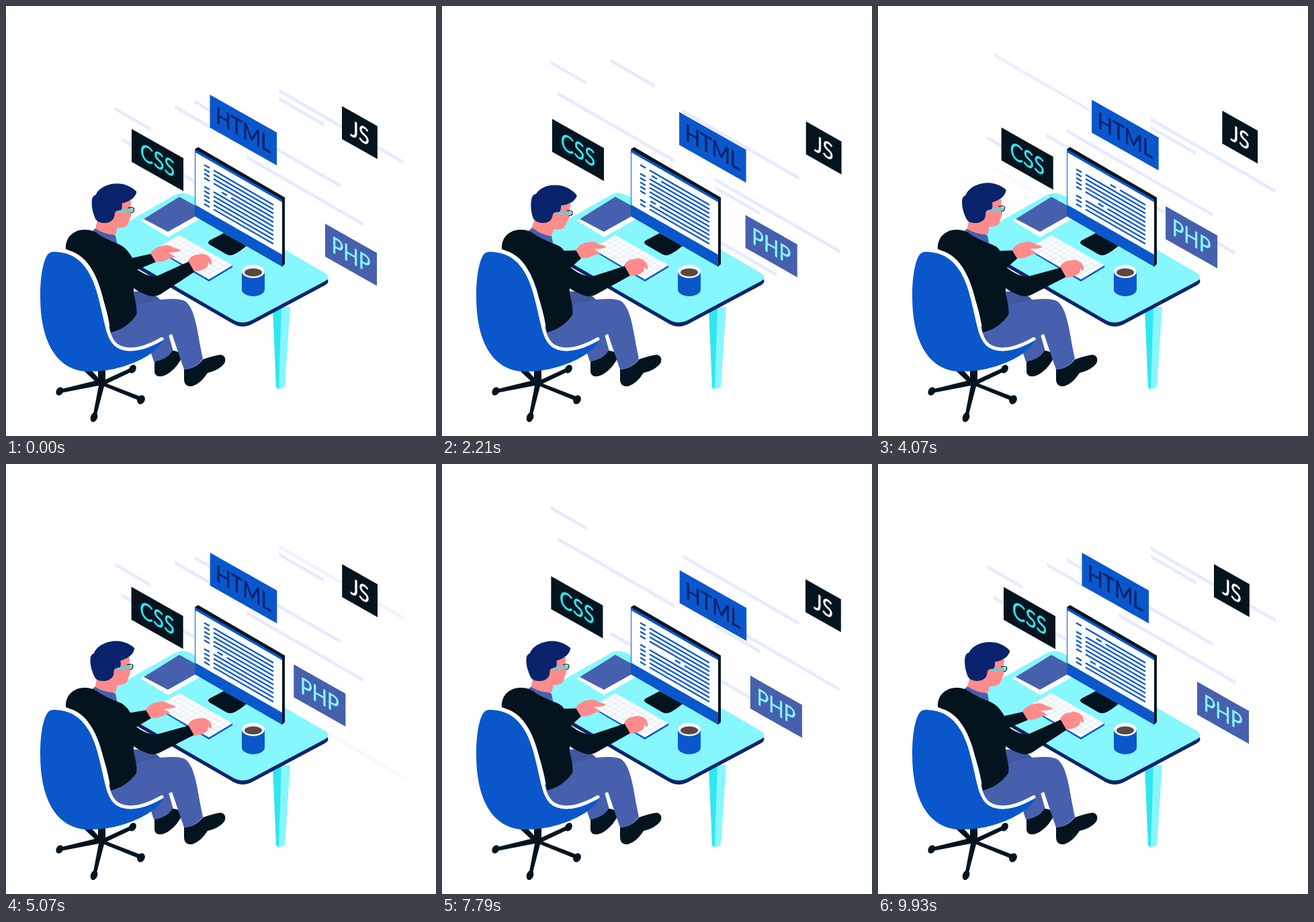
An HTML page for the animation above (10000 ms loop, 640 by 640 pixels).

```html
<!DOCTYPE html>
<html lang="en">
<head>
<meta charset="utf-8">
<style>
html, body { margin: 0; width: 100%; height: 100%; overflow: hidden; background: #fff; }
svg { display: block; width: 100%; height: 100%; }
text { font: 34px Lato, sans-serif; text-anchor: middle; stroke-width: 0.5px; }
.blue { fill: #0a57cb; } .navy { fill: #08236c; } .ink { fill: #04141f; }
.slate { fill: #4660ae; } .cyan { fill: #86f6ff; } .teal { fill: #30e6ef; }
.skin { fill: #ff8b8b; } .white { fill: #fff; }
</style>
</head>
<body>
<svg viewBox="0 0 640 640">
  <defs>
    <path id="top" d="M160 333L250 282Q262 275 276 282L474 397Q485 404 474 410L367 467Q352 475 338 467L160 364Z"/>
  </defs>
  <g id="streaks" fill="#e6ebff"></g>
  <g id="labels"></g>

  <!-- desk -->
  <path class="cyan" d="M397 448H423L415 567Q409 572 403 568Z"/>
  <path class="teal" d="M397 448H410L406 570Q403 570 402 567Z"/>
  <use href="#top" class="navy" y="6"/>
  <use href="#top" class="cyan"/>
  <path class="white" d="M200 319L206 316L241 335L294 305V314L241 344Z"/>
  <path class="slate" d="M205 317L258 284L296 305L241 336Z"/>

  <!-- monitor -->
  <path class="ink" d="M303 349L324 338L358 357Q350 364 341 369Q333 373 327 369L303 355Q299 352 303 349Z"/>
  <path class="ink" d="M281 213L286 210L415 285V384L411 388Z"/>
  <path class="blue" d="M281 213L411 288V388L281 313Z"/>
  <path class="white" d="M282 218L411 292V370L282 296Z"/>
  <path id="code" fill="none" stroke="#0a57cb" stroke-width="2.3"/>

  <!-- keyboard and mug -->
  <path class="blue" d="M223 361V363L302 410L337 389V386Z"/>
  <path class="white" d="M223 361L258 341L337 386L302 407Z"/>
  <path id="keys" fill="none" stroke="#d9e6f5"/>
  <path class="blue" d="M351 395V422A17 10 0 0 0 385 422V395Z"/>
  <ellipse cx="368" cy="395" rx="17" ry="10" fill="#f3f5fb"/>
  <ellipse cx="368" cy="396.500" rx="13" ry="6" fill="#5b4940"/>

  <!-- chair base -->
  <path class="ink" d="M137 541H148V556L187 538L190 543L150 562L202 582L200 588L146 566L134 612H129L138 565L81 576L79 571L132 558L116 543H128L137 553Z"/>
  <g class="ink">
    <ellipse cx="80" cy="573.500" rx="5" ry="6.500" transform="rotate(30 80 573)"/>
    <ellipse cx="131" cy="612" rx="5" ry="7.500" transform="rotate(20 131 612)"/>
    <ellipse cx="201" cy="586" rx="5.500" ry="7" transform="rotate(30 201 586)"/>
    <ellipse cx="188.500" cy="540" rx="5" ry="6.500" transform="rotate(30 188 540)"/>
  </g>

  <!-- legs -->
  <path d="M188 425Q218 423 230 438L195 462Z" fill="#3f58a0"/>
  <path class="slate" d="M212 505L242 489L249 514Q236 529 220 529Z"/>
  <path class="ink" d="M221 529Q240 526 248 513Q256 513 263 520Q256 538 240 548Q224 556 221 545Z"/>
  <path class="slate" d="M150 480L190 448Q206 440 230 437Q256 434 266 439C283 450 285 490 293 525Q282 540 265 541L247 488L200 511L165 508Z"/>
  <path class="ink" d="M265 541Q282 540 293 526Q310 520 320 519Q328 521 326 530Q320 541 300 546Q290 562 277 566Q265 567 265 555Z"/>

  <!-- body -->
  <path class="slate" d="M127 336L138 327L163 342L166 357L150 352Z"/>
  <path class="ink" d="M89 362C88 342 103 332 119 333Q130 333 141 342L166 355L190 388V428Q196 452 194 460Q180 480 156 486C150 440 128 375 89 362Z"/>
  <path id="leftArm" class="ink"/>
  <path id="leftHand" class="skin" d="M215 368Q222 358 233 357Q242 354 250 360Q258 361 260 365Q250 367 242 367Q250 371 252 374Q246 374 239 378Q231 382 222 380Z"/>
  <path id="rightArm" class="ink"/>
  <path id="rightHand" class="skin" d="M271 379Q276 370 286 370Q294 367 301 372Q307 377 306 385Q303 385 301 381Q301 384 300 388Q293 395 280 395Z"/>

  <g id="head">
    <path class="skin" d="M160 290H187L186 299L187 311L181 326Q177 331 166 330L163 341Q146 340 133 331L137 316Z"/>
    <path class="navy" d="M128 293Q128 282 134 281C141 266 164 261 180 267Q190 271 195 277Q192 290 173 294Q174 303 170 305Q163 303 162 312Q160 322 148 323Q136 323 133 316Q128 304 128 293Z"/>
    <ellipse class="skin" cx="166" cy="311" rx="4" ry="6"/>
    <path d="M182 301Q191 299 191 303Q191 308 186 308" fill="none" stroke="#04141f" stroke-width="1.200"/>
    <path d="M168 306L190 304" stroke="#30e6ef" stroke-width="3"/>
  </g>

  <!-- chair shell -->
  <path class="blue" d="M62 370Q66 365 75 366C112 368 129 397 139 440C149 480 150 503 172 511C190 517 212 510 234 497Q226 516 190 531C160 543 140 544 118 544C75 540 51 500 51 432C51 400 56 378 62 370Z"/>
  <path d="M92 366C120 373 135 405 143 440C150 475 152 497 166 506C185 517 210 508 232 495.500" fill="none" stroke="#fff" stroke-width="5" stroke-linecap="round"/>
</svg>
<script>
const LOOP = 10000, END = 9930, HALF = END / 2, SLOPE = 0.577;
const $ = id => document.getElementById(id);
const set = (id, name, value) => $(id).setAttribute(name, value);
const clamp = v => Math.max(0, Math.min(1, v));
const random = n => Math.abs(Math.sin(n * 91.7) * 4375.5) % 1;

function add(parent, tag, attrs = {}) {
  const el = document.createElementNS('http://www.w3.org/2000/svg', tag);
  for (const name in attrs) el.setAttribute(name, attrs[name]);
  return $(parent).appendChild(el);
}

// Eases 0, 1, 0, 1 ... between the given turning times.
function swing(t, turns) {
  let i = 0;
  while (i < turns.length - 2 && t > turns[i + 1]) i++;
  const k = clamp((t - turns[i]) / (turns[i + 1] - turns[i])) + i % 2;
  return (1 - Math.cos(Math.PI * k)) / 2;
}
const once = t => Math.sin(Math.PI * t / END) ** 2;
const twice = t => Math.sin(Math.PI * t / HALF) ** 2;

let keyLines = '';
for (let i = 1; i < 5; i++) keyLines += `M${223 + 7 * i} ${361 - 4 * i}l79 45.500`;
for (let i = 1; i < 12; i++) keyLines += `M${223 + 6.6 * i} ${361 + 3.8 * i}l35 -20`;
set('keys', 'd', keyLines);

// Streaks: x, y at the cycle start, width, time of the hand-over.
const streaks = [
  [162, 150, 53, 3250], [172, 196, 174, 4150], [251, 147, 66, 2620], [281, 140, 217, 1600],
  [406, 123, 186, 150], [406, 135, 67, 500], [358, 222, 174, 3070]
].map(([x, y, w, swap]) => {
  const d = `M${x} ${y}l${w} ${w * SLOPE}v5.500l${-w} ${-w * SLOPE}z`;
  return { swap, leaving: add('streaks', 'path', { d }), arriving: add('streaks', 'path', { d }) };
});

function place(el, dy, opacity) {
  el.setAttribute('transform', `translate(0 ${dy})`);
  el.setAttribute('opacity', opacity);
}

// Labels lie in an isometric plane; dx and dy are their drift.
const label = (name, x, y, width, cls, color, dx, dy, drift) => {
  const g = add('labels', 'g');
  g.innerHTML = `<rect class="${cls}" width="${width}" height="49"/>` +
    `<text x="${width / 2}" y="36.500" fill="${color}" stroke="${color}">${name}</text>`;
  return { g, x, y, dx, dy, drift };
};
const labels = [
  label('CSS', 187, 183, 89, 'ink', '#30e6ef', -25.5, -16.7, t => swing(t, [0, 1550, 4850, 7500, END])),
  label('HTML', 303.5, 132, 115, 'blue', '#08236c', 51, 26.5, t => swing(t, [0, 2480, HALF, 7600, END])),
  label('JS', 500, 149, 61, 'ink', '#fff', 43, 23.5, twice),
  label('PHP', 475, 324, 89, 'slate', '#86f6ff', -48, -26.5, t => swing(t, [0, 4500, END]))
];

// Every sixth row has no bullet and a broken start.
function codeRow(row) {
  if (row % 6 !== 4) return [[295, 303], [309, 398]];
  const x = 302 + 45 * random(row);
  return [[x, x + 8], [x + 14, 398]];
}

function drawCode(t) {
  const first = Math.floor(t / LOOP * 70);
  let d = '';
  for (let i = 0; i < 10; i++)
    for (const [a, b] of codeRow(first + i))
      d += `M${a} ${236.5 + 6.45 * i + (a - 295) * SLOPE}l${b - a} ${(b - a) * SLOPE}`;
  set('code', 'd', d);
}

function drawMan(t) {
  const nod = clamp(2 * swing(t, [-1300, 1600, 4400, 6300, 8600, 11200]) - 0.5);
  set('head', 'transform', `rotate(${10 * nod - 4} 148 336)`);

  const x = -16 * clamp(2 * twice(t) + 0.44 * once(t)), y = x / 3;
  set('leftHand', 'transform', `translate(${x} ${y})`);
  set('leftArm', 'd', `M150 347L164 353Q178 357 ${188 + 0.4 * x} ${375 + 2 * y}L${215 + x} ${369 + y}` +
    `Q${222 + x} ${373 + y} ${223 + x} ${381 + y}L${194 + 0.4 * x} 393L188 400H150Z`);

  const drop = 9 * clamp(3 * once(t) - 0.5);
  set('rightHand', 'transform', `translate(0 ${drop})`);
  set('rightArm', 'd', `M186 384Q203 401 222 403L273 ${380 + drop}Q279 ${386 + drop} 280 ${396 + drop * 0.8}` +
    'L230 429Q222 434 212 431Q192 424 186 416Z');
}

function draw(now) {
  const t = Math.min(now % LOOP, END), phase = t % HALF;
  for (const { swap, leaving, arriving } of streaks) {
    const mix = clamp((phase - swap + 150) / 300);
    place(leaving, -0.031 * phase, 1 - mix);
    place(arriving, 0.048 * (HALF - phase), mix);
  }
  for (const { g, x, y, dx, dy, drift } of labels) {
    const k = drift(t);
    g.setAttribute('transform', `matrix(.866 .489 0 1 ${x + dx * k} ${y + dy * k})`);
  }
  drawCode(t);
  drawMan(t);
}

const start = performance.now();
(function tick() {
  draw(performance.now() - start);
  requestAnimationFrame(tick);
})();
</script>
</body>
</html>
```
